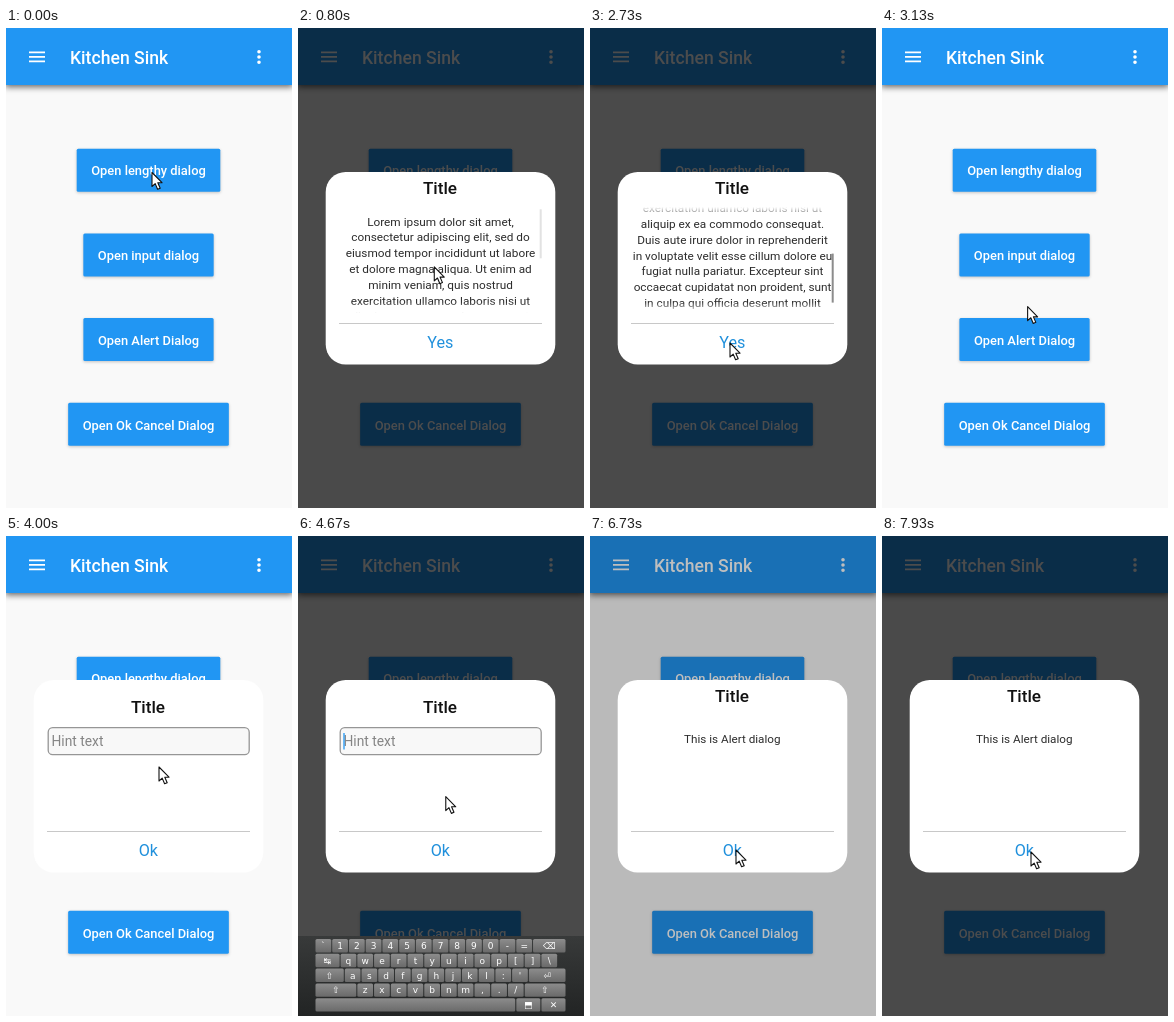
These frames come from a looping animation (286 by 480 pixels, 8 s). An HTML page:

```html
<!DOCTYPE html>
<html lang="en">
<head>
<meta charset="utf-8">
<title>Dialogs demo</title>
<style>
html, body { margin: 0; width: 100%; height: 100%; overflow: hidden; background: #f9f9f9; }
svg { display: block; width: 100vw; height: 100vh; }
text { font-family: Roboto, "Open Sans", sans-serif; }
.mid { text-anchor: middle; }
.medium { font-weight: 500; }
.bar { filter: drop-shadow(0 2px 3px rgba(0, 0, 0, .6)); }
.button { fill: #2196f3; filter: drop-shadow(0 1px 1.5px rgba(0, 0, 0, .22)); }
.label { font-size: 12.9px; fill: #fff; }
.body { fill: #2c2c2c; }
.key { font: 9px "DejaVu Sans", sans-serif; fill: #fff; text-anchor: middle; }
</style>
</head>
<body>
<svg viewBox="0 0 286 480" preserveAspectRatio="none">
  <defs>
    <linearGradient id="edge" x2="0" y2="1">
      <stop offset="0" stop-color="#000"/>
      <stop offset=".1" stop-color="#fff"/>
      <stop offset=".9" stop-color="#fff"/>
      <stop offset="1" stop-color="#000"/>
    </linearGradient>
    <mask id="view" maskUnits="userSpaceOnUse" x="28" y="179" width="229" height="106">
      <rect x="28" y="179" width="229" height="106" fill="url(#edge)"/>
    </mask>
    <linearGradient id="keyFill" x2="0" y2="1">
      <stop offset="0" stop-color="#8c8c8c"/>
      <stop offset="1" stop-color="#6a6a6a"/>
    </linearGradient>
    <linearGradient id="boardFill" x2="0" y2="1">
      <stop offset="0" stop-color="#383a3a"/>
      <stop offset="1" stop-color="#222424"/>
    </linearGradient>
  </defs>
  <rect width="286" height="480" fill="#f9f9f9"/>
  <g id="buttons"></g>
  <rect class="bar" x="-1" y="-10" width="288" height="67" fill="#2196f3"/>
  <path d="M23 24.3h16M23 28.8h16M23 33.3h16" stroke="#fff" stroke-width="1.8"/>
  <path d="M253 23.8v10.5" stroke="#fff" stroke-width="3.6" stroke-linecap="round" stroke-dasharray="0 5.2"/>
  <text class="medium" x="64" y="36" font-size="17.6" fill="#fff">Kitchen Sink</text>
  <rect id="dim" width="286" height="480"/>
  <g id="dialog">
    <rect x="27.7" y="144" width="229.6" height="192.5" rx="20" fill="#fff"/>
    <text id="title" class="mid medium" x="142" font-size="17.2" fill="#111">Title</text>
    <path d="M41 295.5H244" stroke="#c8c8c8"/>
    <text id="action" class="mid" x="142.3" y="319.8" font-size="16.2" fill="#2090dc"></text>
    <g id="lengthy">
      <g mask="url(#view)"><g id="lines" class="mid body" font-size="11.8"></g></g>
      <rect id="thumb" x="241.7" width="2" height="49" fill="#8c8c8c"/>
    </g>
    <g id="input">
      <rect x="42.2" y="191.7" width="201" height="27" rx="4.5" fill="#f8f8f8" stroke="#969696" stroke-width="1.3"/>
      <text x="45.5" y="210" font-size="13.8" fill="#858585">Hint text</text>
      <path id="caret" d="M46 197V213.5" stroke="#2196f3" stroke-width="1.3"/>
    </g>
    <text id="alert" class="mid body" x="142.3" y="207.3" font-size="11.7">This is Alert dialog</text>
  </g>
  <g id="keyboard"><rect y="400" width="286" height="80" fill="url(#boardFill)"/></g>
  <path id="cursor" d="M0 0V14L3.2 11.1 5.6 16.8 8.2 15.7 5.8 10.2H10Z" fill="#fff" stroke="#111" stroke-width="1.1" stroke-linejoin="round"/>
</svg>
<script>
const $ = id => document.getElementById(id);
const LOOP = 8000, FPS = 15, FADE = 200, DIM = 0.7, MIDDLE = 142.5;

function add(parent, tag, attrs, label = "") {
  const el = document.createElementNS("http://www.w3.org/2000/svg", tag);
  for (const k in attrs) el.setAttribute(k, attrs[k]);
  el.textContent = label;
  parent.append(el);
  return el;
}

// Buttons fit their labels
["Open lengthy dialog", "Open input dialog", "Open Alert Dialog", "Open Ok Cancel Dialog"].forEach((label, i) => {
  const y = 120.7 + i * 84.7;
  const box = add($("buttons"), "rect", { class: "button", y, height: 43, rx: 1.5 });
  const text = add($("buttons"), "text", { class: "mid medium label", x: MIDDLE, y: y + 26.7 }, label);
  const width = text.getComputedTextLength() + 29;
  box.setAttribute("width", width);
  box.setAttribute("x", MIDDLE - width / 2);
});

`Lorem ipsum dolor sit amet,
consectetur adipiscing elit, sed do
eiusmod tempor incididunt ut labore
et dolore magna aliqua. Ut enim ad
minim veniam, quis nostrud
exercitation ullamco laboris nisi ut
aliquip ex ea commodo consequat.
Duis aute irure dolor in reprehenderit
in voluptate velit esse cillum dolore eu
fugiat nulla pariatur. Excepteur sint
occaecat cupidatat non proident, sunt
in culpa qui officia deserunt mollit
anim id est laborum.`.split("\n").forEach((line, i) =>
  add($("lines"), "text", { x: MIDDLE, y: 197.6 + i * 15.8 }, line));

// A number after a key is its width in units
const UNIT = 251 / 15;
["` 1 2 3 4 5 6 7 8 9 0 - = ⌫:2",
 "↹:1.5 q w e r t y u i o p [ ] \\",
 "⇧:1.75 a s d f g h j k l : ' ⏎:2.25",
 "⇧:2.5 z x c v b n m , . / ⇧:2.5",
 ":12 ⬒:1.5 ✕:1.5"].forEach((keys, row) => {
  const y = 403 + row * 14.8;
  let x = 17;
  for (const key of keys.split(" ")) {
    const [, label, units] = key.match(/^(.*?)(?::([\d.]+))?$/);
    const w = (units || 1) * UNIT;
    add($("keyboard"), "rect", { x: x + 0.5, y, width: w - 1, height: 13.4, rx: 1.5, fill: "url(#keyFill)" });
    add($("keyboard"), "text", { class: "key", x: x + w / 2, y: y + 10 }, label);
    x += w;
  }
});

const dialogs = [
  { body: "lengthy", action: "Yes", titleY: 165.8, open: 200, close: 2930 },
  { body: "input", action: "Ok", titleY: 176.5, open: 4000, close: 5530 },
  { body: "alert", action: "Ok", titleY: 165.8, open: 6660, close: Infinity }
];

// Two upward strokes with a return between them
const drag = { start: 1270, period: 420, end: 1900 };

const moves = [
  { at: 600, for: 470, to: [134, 261] },
  { at: drag.start, for: 630, to: [152.3, 199] },
  { at: drag.end, for: 530, to: [140, 358] },
  { at: 2430, for: 300, to: [140, 315] },
  { at: 3030, for: 600, to: [153, 231] },
  { at: 4070, for: 200, to: [150, 197] },
  { at: 4500, for: 700, to: [146, 311] },
  { at: 5530, for: 340, to: [146, 314] },
  { at: 7000, for: 330, to: [157, 320] },
  { at: 7330, for: 200, to: [165, 315] },
  { at: 7700, for: 230, to: [149, 316] }
];

const progress = (t, start, span) => Math.min(1, Math.max(0, (t - start) / span));
const easeOut = p => 1 - (1 - p) ** 3;
const show = (id, on) => $(id).setAttribute("display", on ? "inline" : "none");

function pointer(t) {
  let x = 146, y = 144.5;
  for (const m of moves) {
    const e = easeOut(progress(t, m.at, m.for));
    x += (m.to[0] - x) * e;
    y += (m.to[1] - y) * e;
  }
  if (t >= drag.start && t < drag.end) {
    y = 230 + 31 * Math.cos((t - drag.start) / drag.period * 2 * Math.PI);
  }
  return [x, y];
}

// Each stroke pushes the text, which then glides to a stop
function scrolled(t) {
  const second = drag.start + drag.period;
  return 43 * easeOut(progress(t, drag.start, drag.period)) + 49.3 * easeOut(progress(t, second, 600));
}

function draw(t) {
  const d = dialogs.find(d => t >= d.open && t < d.close + FADE);
  show("dialog", d);
  $("dim").setAttribute("opacity", d ? DIM * (progress(t, d.open, FADE) - progress(t, d.close, FADE)) : 0);
  if (d) {
    dialogs.forEach(o => show(o.body, o === d));
    $("action").textContent = d.action;
    $("title").setAttribute("y", d.titleY);
  }

  const offset = scrolled(t);
  $("lines").setAttribute("transform", `translate(0 ${-offset})`);
  $("thumb").setAttribute("y", 181.3 + offset * 0.48);
  $("thumb").setAttribute("opacity", t < drag.start ? 0.25 : 1);

  const typing = t >= 4530 && t < 5530;
  show("caret", typing);
  show("keyboard", typing);
  $("cursor").setAttribute("transform", `translate(${pointer(t)})`);
}

const start = performance.now();
function tick() {
  const t = (performance.now() - start) % LOOP;
  draw(Math.floor((t + 4) * FPS / 1000) * 1000 / FPS);
  requestAnimationFrame(tick);
}
tick();
</script>
</body>
</html>
```
